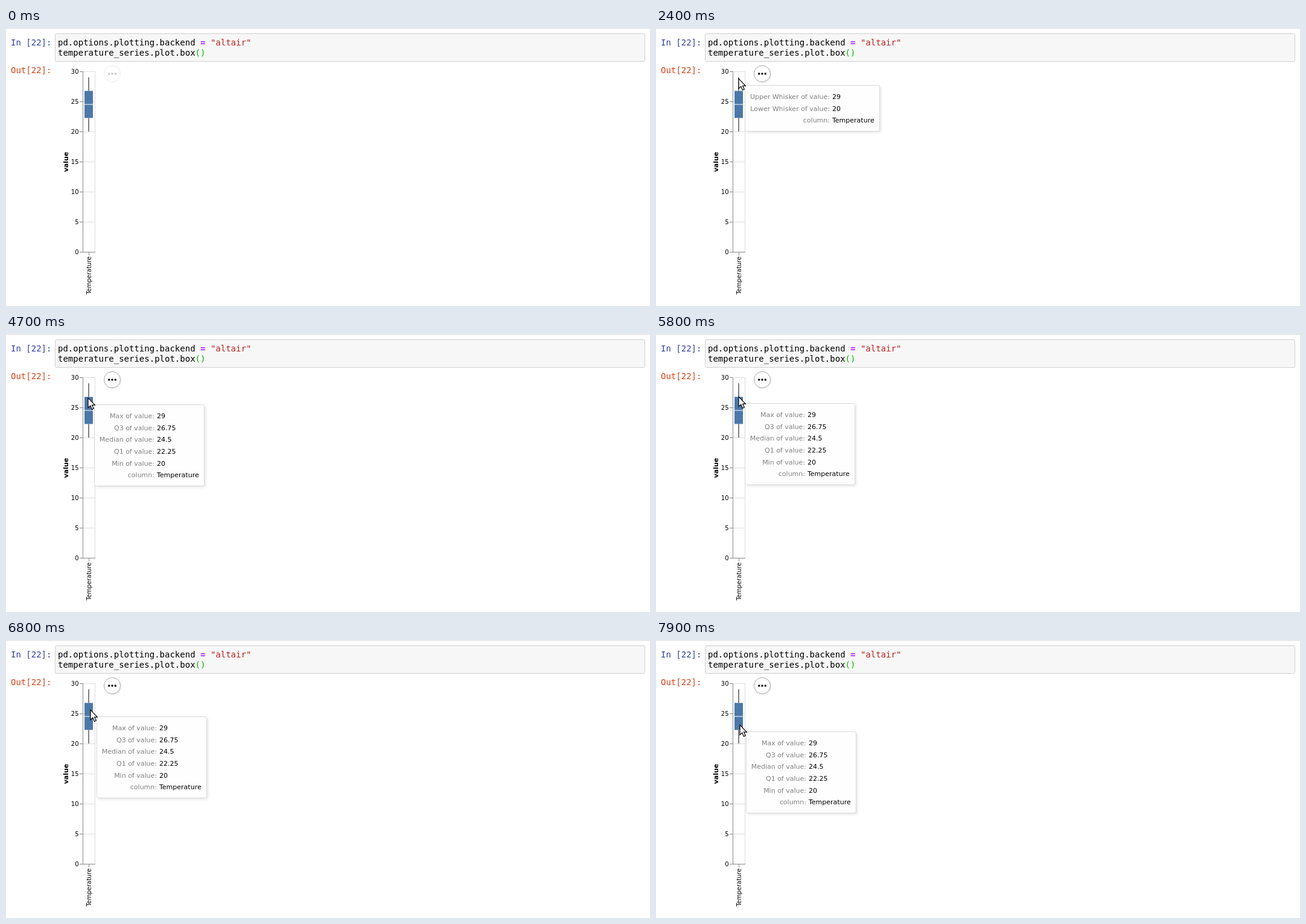
An HTML page for the animation above (8 s loop, 1067 by 462 pixels).

```html
<!DOCTYPE html>
<html lang="en">
<head>
<meta charset="utf-8">
<title>Box plot tooltips</title>
<style>
  html, body { margin: 0; width: 100%; height: 100%; overflow: hidden; background: #fff; }
  svg { display: block; width: 1067px; height: 462px; }
  text { white-space: pre; }
  .code { font: 14px "DejaVu Sans Mono", monospace; }
  .axis { font: 10px "DejaVu Sans", sans-serif; }
  .tip { font: 11px "DejaVu Sans", sans-serif; }
  .title { font: bold 11px "DejaVu Sans", sans-serif; }
  .card { fill: #fff; fill-opacity: .95; stroke: #d9d9d9; filter: drop-shadow(2px 2px 2px rgba(0,0,0,.1)); }
  .ring { fill: #fff; stroke: #aaa; filter: drop-shadow(1px 1px 1.5px rgba(0,0,0,.1)); }
</style>
</head>
<body>
<svg viewBox="0 0 1067 462">
  <rect width="1067" height="462" fill="#fff"/>
  <rect width="1067" height="1" fill="#e4e4e4"/>
  <rect y="1" width="1067" height="1" fill="#f3f3f3"/>

  <rect x="81.5" y="9.5" width="977" height="46" rx="2" fill="#f7f7f7" stroke="#cfcfcf"/>
  <g class="code">
    <text x="8" y="29" fill="#303f9f">In [22]:</text>
    <text x="8" y="75" fill="#d84315">Out[22]:</text>
    <text x="86" y="29">pd.options.plotting.backend <tspan fill="#a2f" font-weight="bold">=</tspan> <tspan fill="#ba2121">"altair"</tspan></text>
    <text x="86" y="46">temperature_series.plot.box<tspan fill="#0b0">()</tspan></text>
  </g>

  <g id="chart">
    <rect x="127.5" y="72.5" width="20" height="300" fill="none" stroke="#ddd"/>
  </g>
  <path d="M127.5 72V373M127 372.5H148M137.5 372V378" stroke="#888" fill="none"/>
  <text class="axis" text-anchor="end" transform="translate(140.5 379.5) rotate(-90)">Temperature</text>
  <text class="title" text-anchor="middle" transform="translate(102.5 222.5) rotate(-90)">value</text>
  <path d="M137 82V104.5M137 149.5V172" stroke="#000"/>
  <rect x="130" y="104.5" width="14" height="45" fill="#4c78a8"/>
  <path d="M130 127H144" stroke="#fff"/>

  <g id="menu">
    <circle class="ring" cx="176" cy="76" r="13.5"/>
    <circle cx="170.75" cy="76" r="1.75"/>
    <circle cx="176" cy="76" r="1.75"/>
    <circle cx="181.25" cy="76" r="1.75"/>
  </g>

  <g id="tips"></g>
  <path id="cursor" d="M1 1.2V17.6L4.8 14.1L7.4 20.2L10.2 19L7.6 13.1H12.3Z"
    fill="#fff" stroke="#000" stroke-width="1.2"/>
</svg>
<script>
const LOOP = 8000, STEP = 100;
const $ = id => document.getElementById(id);

function add(parent, tag, attrs, label) {
  const el = document.createElementNS("http://www.w3.org/2000/svg", tag);
  for (const k in attrs) el.setAttribute(k, attrs[k]);
  if (label !== undefined) el.textContent = label;
  return parent.appendChild(el);
}

for (let v = 0; v <= 30; v += 5) {
  const y = 372.5 - v * 10;
  add($("chart"), "path", { d: `M127.5 ${y}H147.5`, stroke: "#ddd" });
  add($("chart"), "path", { d: `M122 ${y}H127`, stroke: "#888" });
  add($("chart"), "text", { class: "axis", x: 120.5, y: y + 3.5, "text-anchor": "end" }, v);
}

function makeTip(width, keyEnd, rows) {
  const g = add($("tips"), "g", { class: "tip" });
  const pitch = 59 / 3;
  add(g, "rect", { class: "card", x: .5, y: .5, width: width - 1, height: 17 + pitch * rows.length, rx: 3 });
  rows.forEach(([key, value], i) => {
    const y = Math.round(9 + pitch * (i + .5)) + 4;
    add(g, "text", { x: keyEnd, y, fill: "#808080", "text-anchor": "end" }, key + ":");
    add(g, "text", { x: keyEnd + 4, y }, value);
  });
  return g;
}

const whiskerTip = makeTip(224, 141, [
  ["Upper Whisker of value", "29"],
  ["Lower Whisker of value", "20"],
  ["column", "Temperature"]
]);
const boxTip = makeTip(183, 100, [
  ["Max of value", "29"],
  ["Q3 of value", "26.75"],
  ["Median of value", "24.5"],
  ["Q1 of value", "22.25"],
  ["Min of value", "20"],
  ["column", "Temperature"]
]);

// [step, x, y, glide]: the pointer holds until the next entry unless that one glides
const path = [
  [13, 138, 76], [14, 138, 79], [15, 137, 82], [16, 135, 84], [17, 136, 85],
  [22, 137, 84], [23, 136, 84], [24, 136, 83], [38, 136, 86], [39, 136, 95],
  [40, 136, 104], [41, 136, 105], [43, 135, 105], [45, 134, 105], [47, 135, 105],
  [52, 135, 103], [58, 136, 103], [60, 137, 104], [61, 138, 105], [63, 138, 105],
  [64, 139, 106], [71, 139, 122, 1], [72, 140, 123], [73, 142, 126], [79, 138, 140, 1]
];

function pointer(n) {
  if (n < 13) {
    const e = 1 - ((13 - n) / 8) ** 2;
    return [Math.round(103 + 35 * e), Math.round(76 * e)];
  }
  let i = path.length - 1;
  while (path[i][0] > n) i--;
  const [t, x, y] = path[i], next = path[i + 1];
  if (!next || !next[3]) return [x, y];
  const u = (n - t) / (next[0] - t);
  return [Math.round(x + (next[1] - x) * u), Math.round(y + (next[2] - y) * u)];
}

function place(el, shown, x, y) {
  el.setAttribute("visibility", shown ? "visible" : "hidden");
  el.setAttribute("transform", `translate(${x} ${y})`);
}

function draw(ms) {
  const n = Math.floor((ms % LOOP) / STEP);
  const [x, y] = pointer(Math.max(n, 5));
  const u = Math.min(1, Math.max(0, (n - 10) / 2));
  $("menu").setAttribute("opacity", .2 + .8 * (1 - (1 - u) ** 2));
  place($("cursor"), n >= 5, x, y);
  place(whiskerTip, n >= 22 && n < 38, x + 11, y + 12);
  place(boxTip, n >= 40, x + 11, y + 12);
}

const start = performance.now();
function tick(now) {
  draw(Math.max(0, now - start));
  requestAnimationFrame(tick);
}
draw(0);
requestAnimationFrame(tick);
</script>
</body>
</html>
```
